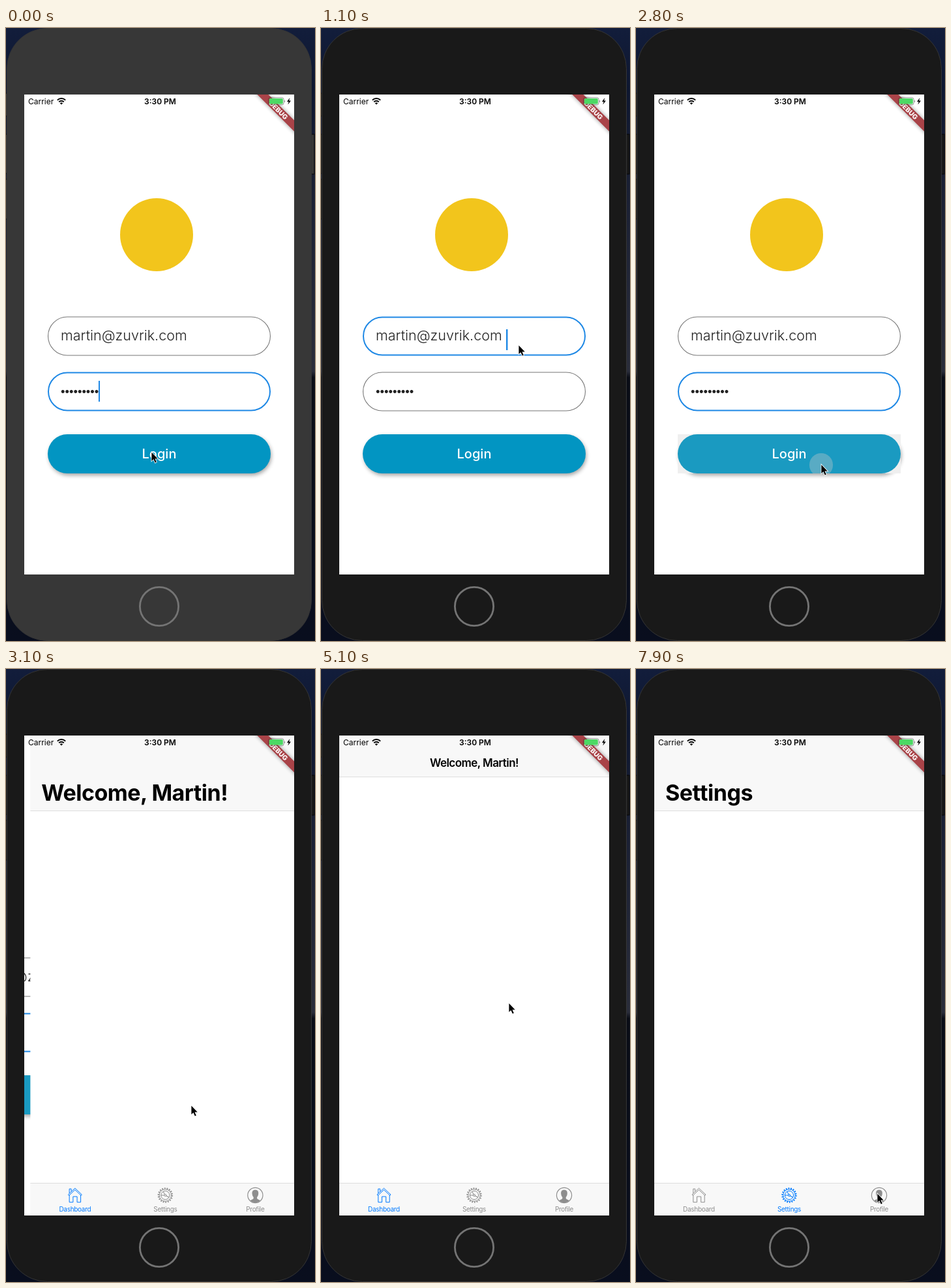
Recreate the animation shown at these times as an HTML page. Size 474 by 940 pixels, loop 8 s.

```html
<!DOCTYPE html>
<html lang="en">
<head>
<meta charset="utf-8">
<title>Login flow</title>
<style>
  html, body { margin: 0; width: 100%; height: 100%; overflow: hidden; background: #101c38; }
  svg { display: block; width: 474px; height: 940px; font-family: Inter, "Open Sans", sans-serif; }
  .large { font-size: 34px; font-weight: 700; letter-spacing: -.5px; }
  .small { font-size: 17px; font-weight: 600; letter-spacing: -.55px; text-anchor: middle; }
  .tab text { font-size: 10px; letter-spacing: -.3px; text-anchor: middle; fill: currentColor; }
  .tab .line { fill: none; stroke: currentColor; }
  .status { font-size: 12px; }
</style>
</head>
<body>
<svg viewBox="0 0 474 940">
  <defs>
    <linearGradient id="wall" x2="0" y2="1">
      <stop offset="0" stop-color="#121d3b"/>
      <stop offset=".1" stop-color="#0e1730"/>
      <stop offset=".24" stop-color="#191f33"/>
      <stop offset=".56" stop-color="#2a2d3a"/>
      <stop offset=".57" stop-color="#0a0d16"/>
      <stop offset="1" stop-color="#090e1e"/>
    </linearGradient>
    <clipPath id="screen"><rect x="28" y="102" width="414" height="736"/></clipPath>
    <clipPath id="belowBar"><rect x="28" y="160" width="414" height="80"/></clipPath>
    <clipPath id="buttonClip"><rect x="64" y="623" width="342" height="60" rx="30"/></clipPath>
    <filter id="soft" x="-20%" y="-60%" width="140%" height="240%"><feGaussianBlur stdDeviation="3"/></filter>
  </defs>

  <rect width="474" height="940" fill="url(#wall)"/>
  <g id="keys" stroke="#050505">
    <rect x="-3" y="100" width="7" height="35"/>
    <rect x="-3" y="163" width="7" height="60"/>
    <rect x="-3" y="232" width="7" height="61"/>
    <rect x="466" y="163" width="7" height="61"/>
  </g>
  <rect id="body" x="1.5" y=".5" width="467" height="939" rx="62" stroke="#353535"/>
  <circle cx="235" cy="887" r="29.6" fill="none" stroke="#747474" stroke-width="2.8"/>

  <g clip-path="url(#screen)">
    <rect x="28" y="102" width="414" height="736" fill="#fff"/>

    <g id="login">
      <rect x="28" y="102" width="414" height="736" fill="#fff"/>
      <circle cx="231" cy="317" r="56" fill="#f2c51c"/>
      <rect id="emailBox" fill="#fff"/>
      <text x="84" y="479" font-size="21.5" font-weight="300" fill="#222">martin@zuvrik.com</text>
      <rect id="emailCaret" x="284" y="462" width="2.4" height="32" fill="#1e88e5"/>
      <rect id="passBox" fill="#fff"/>
      <text x="84" y="563.5" font-size="18.5" fill="#222" font-family="Liberation Sans, sans-serif">•••••••••</text>
      <rect id="passCaret" x="142" y="541" width="2" height="32" fill="#1e88e5"/>
      <rect x="66" y="626" width="341" height="60" rx="30" opacity=".36" filter="url(#soft)"/>
      <rect id="corners" x="64" y="623" width="342" height="60" fill="#efefef"/>
      <rect x="64" y="623" width="342" height="60" rx="30" fill="#0295c2"/>
      <g id="press" clip-path="url(#buttonClip)">
        <rect x="64" y="623" width="342" height="60" fill="#bcbcbc" opacity=".13"/>
        <circle id="ripple" cx="284" cy="670" fill="#c8c8c8" opacity=".36"/>
      </g>
      <text x="235" y="660" font-size="20" font-weight="500" fill="#fff" text-anchor="middle">Login</text>
    </g>

    <g id="home">
      <rect x="28" y="102" width="414" height="736" fill="#fff"/>
      <rect id="bar" x="28" y="102" width="414" fill="#f8f8f8"/>
      <rect id="barLine" x="28" width="414" height="1" fill="#dedede"/>
      <g clip-path="url(#belowBar)"><text id="largeTitle" class="large" x="45"></text></g>
      <text id="smallTitle" class="small" x="235" y="150">Welcome, Martin!</text>
      <rect x="28" y="788" width="414" height="50" fill="#f8f8f8"/>
      <rect x="28" y="788" width="414" height="1" fill="#dedede"/>
      <g class="tab" transform="translate(96.5 807)">
        <path class="line" d="M-10.5-1 0-10.8 10.5-1M-10.5-1 -9.3.4 0-8.3 9.3.4 10.5-1M-8.7-.2V10.7H-3V2H3.2V10.7H8.7V-.2M-8.7-3V-9.8H-5.8V-5.8"/>
        <text y="25">Dashboard</text>
      </g>
      <g class="tab" transform="translate(235 807)">
        <circle class="line" r="10.6" stroke-width="2.2" stroke-dasharray="1.85 1.85"/>
        <circle class="line" r="9.2"/>
        <circle class="line" r="6.6"/>
        <circle class="line" r="1.5"/>
        <path class="line" d="M-1.3-.8-5.7-3.3M-1.3.8-5.7 3.3M1.5 0H6.6" transform="rotate(30)"/>
        <text y="25">Settings</text>
      </g>
      <g class="tab" transform="translate(373 807)">
        <circle class="line" r="11.6" stroke-width="1.2"/>
        <path fill="currentColor" d="M0-8.3C4-8.3 5.2-5.6 4.8-2.2C4.6.6 3.6 2 2.7 3V5C4 6.7 6.5 6.6 7.6 8.2C3.5 12-3.5 12-7.6 8.2C-6.5 6.6-4 6.7-2.7 5V3C-3.6 2-4.6.6-4.8-2.2C-5.2-5.6-4-8.3 0-8.3Z"/>
        <text y="25">Profile</text>
      </g>
    </g>

    <g transform="translate(442 102) rotate(45)">
      <rect x="-60" y="28" width="120" height="12" opacity=".4" filter="url(#soft)"/>
      <rect x="-60" y="28" width="120" height="12" fill="#a94348"/>
      <text y="37.7" font-size="10.2" font-weight="800" fill="#fff" text-anchor="middle">DEBUG</text>
    </g>
    <g class="status">
      <text x="34" y="117">Carrier</text>
      <text x="236.5" y="117" font-weight="600" text-anchor="middle">3:30 PM</text>
      <g fill="none" stroke="#000" stroke-width="2">
        <path d="M78.8 110.6A9 9 0 0 1 91.2 110.6M81.2 113.3A5.4 5.4 0 0 1 88.8 113.3"/>
      </g>
      <path d="M85 117.6 82.8 115.2A3.2 3.2 0 0 1 87.2 115.2Z"/>
      <rect x="402.5" y="106.8" width="23.6" height="11" rx="2.8" fill="none" stroke="#333" stroke-opacity=".5"/>
      <rect x="403.8" y="108" width="21" height="8.6" rx="1.6" fill="#4cd964"/>
      <path d="M427.2 110.4Q429.2 112.3 427.2 114.2Z" fill="#777"/>
      <path d="M435.3 107 431 113H433.6L432.4 117.6 437 111.5H434.2Z"/>
    </g>
  </g>

  <path id="pointer" d="M.4.8V14L3.4 11.2 5.8 16.6 7.8 15.7 5.5 10.4H9.7Z" stroke="#fff" stroke-width="1.6" paint-order="stroke"/>
</svg>
<script>
  const LOOP = 8000;
  const BLUE = '#007aff', GRAY = '#8e8e8e';
  const EMAIL_TAP = 1000, PASS_TAP = 2000, PRESS = 2700, PUSH = 2850, TAB_TAP = 6900;

  // Pointer stops: time, x, y
  const stops = [
    [0, 223, 650], [100, 223, 650], [900, 303, 486], [1300, 303, 486],
    [1900, 288, 562], [2150, 288, 562], [2600, 284, 669], [4000, 284, 669],
    [4200, 297, 688], [4300, 297, 688], [4800, 288, 512], [5400, 288, 512],
    [5850, 290, 690], [6200, 198, 799], [6300, 223, 804], [7000, 223, 804],
    [7600, 362, 812], [7900, 370, 804], [8000, 370, 804]
  ];

  const el = {};
  document.querySelectorAll('[id]').forEach(node => el[node.id] = node);
  const tabs = [...document.querySelectorAll('.tab')];

  const clamp = (v, lo = 0, hi = 1) => Math.min(hi, Math.max(lo, v));
  const set = (node, attrs) => {
    for (const key in attrs) node.setAttribute(key, attrs[key]);
  };
  const show = (node, on) => set(node, { visibility: on ? 'visible' : 'hidden' });

  function pointerAt(t) {
    const i = stops.findIndex(s => s[0] > t);
    const [t0, x0, y0] = stops[i - 1], [t1, x1, y1] = stops[i];
    const u = (t - t0) / (t1 - t0), k = u * u * (3 - 2 * u);
    return [x0 + (x1 - x0) * k, y0 + (y1 - y0) * k];
  }

  function caretOpacity(sinceFocus) {
    const phase = sinceFocus % 1000;
    return phase > 900 ? (phase - 900) / 100 : clamp((510 - phase) / 100);
  }

  // The outline is drawn inside the 342 x 60 field
  function drawField(box, caret, top, focused, sinceFocus) {
    const line = focused ? 2 : 1.1;
    set(box, {
      x: 64 + line / 2, y: top + line / 2,
      width: 342 - line, height: 60 - line, rx: 30 - line / 2,
      stroke: focused ? '#1e88e5' : '#777', 'stroke-width': line
    });
    set(caret, { opacity: focused ? caretOpacity(sinceFocus) : 0 });
  }

  function drawLogin(t, slide) {
    const onEmail = t >= EMAIL_TAP && t < PASS_TAP;
    const passFocus = t < EMAIL_TAP ? -300 : PASS_TAP;
    drawField(el.emailBox, el.emailCaret, 442.5, onEmail, t - EMAIL_TAP);
    drawField(el.passBox, el.passCaret, 527.5, !onEmail, t - passFocus);
    const pressed = t >= PRESS && slide < 1;
    show(el.press, pressed);
    show(el.corners, pressed);
    set(el.ripple, { r: Math.max(0, 8 + (t - PRESS) * .1) });
    set(el.login, { transform: `translate(${-138 * slide} 0)` });
  }

  function drawHome(t, slide, pointerY) {
    const onSettings = t >= TAB_TAP;
    const scroll = clamp(658 - pointerY, 0, 52);
    const collapsed = clamp((scroll - 36) / 16);
    show(el.home, slide > 0);
    set(el.home, { transform: `translate(${414 * (1 - slide)} 0)` });
    set(el.bar, { height: 116 - scroll });
    set(el.barLine, { y: 217 - scroll });
    set(el.largeTitle, { y: 201.5 - scroll, opacity: 1 - collapsed });
    set(el.smallTitle, { opacity: collapsed });
    el.largeTitle.textContent = onSettings ? 'Settings' : 'Welcome, Martin!';
    tabs.forEach((tab, i) => set(tab, { color: i === (onSettings ? 1 : 0) ? BLUE : GRAY }));
  }

  function draw(t) {
    const [x, y] = pointerAt(t);
    const slide = 1 - (1 - clamp((t - PUSH) / 350)) ** 3;
    const shell = t < 500 ? '#373737' : '#191919';
    set(el.body, { fill: shell });
    set(el.keys, { fill: shell });
    drawLogin(t, slide);
    drawHome(t, slide, y);
    set(el.pointer, { transform: `translate(${x} ${y})` });
  }

  function tick() {
    draw(performance.now() % LOOP);
    requestAnimationFrame(tick);
  }
  tick();
</script>
</body>
</html>
```
